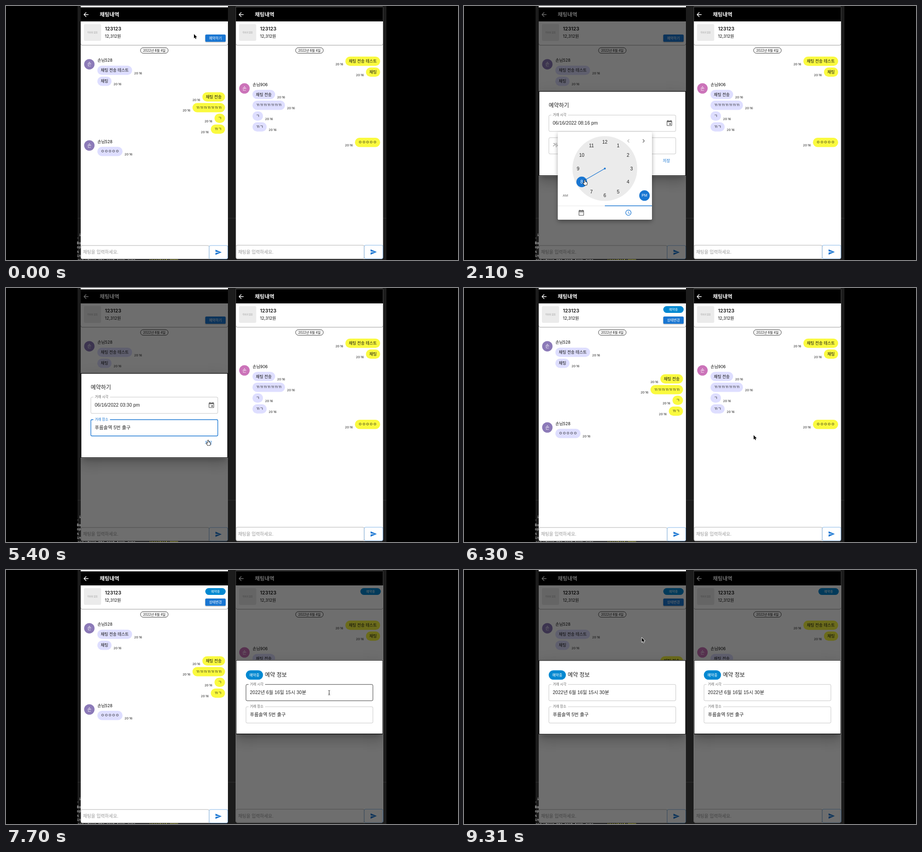
Write an HTML page with a canvas that moves like this. It is 998x561 px and loops after 9420 ms.

```html
<!DOCTYPE html>
<html lang="ko">
<head>
<meta charset="utf-8">
<title>채팅 예약</title>
<style>
html, body { margin: 0; width: 100%; height: 100%; overflow: hidden; background: #000; }
canvas { display: block; width: 998px; height: 561px; }
</style>
</head>
<body>
<canvas id="stage"></canvas>
<script>
const W = 998, H = 561, LOOP = 9420;
const canvas = document.getElementById('stage');
const ctx = canvas.getContext('2d');
const ratio = window.devicePixelRatio || 1;
canvas.width = W * ratio;
canvas.height = H * ratio;

const BLUE = '#1976d2', CHIP = '#0288d1', INK = 'rgba(0,0,0,.87)', GREY = 'rgba(0,0,0,.6)';
const CHAT = 'Inter, "Noto Sans CJK KR", "Noto Sans CJK", sans-serif';
const FORM = '"Liberation Sans", "Noto Sans CJK KR", "Noto Sans CJK", sans-serif';
const MONO = '"DejaVu Sans Mono", monospace';
const PLACE = '푸름솔역 5번 출구';
const SHIFT = 342.5;

const ICON = {
  back: 'M20 11H7.83l5.59-5.59L12 4l-8 8 8 8 1.41-1.41L7.83 13H20v-2z',
  send: 'M2.01 21 23 12 2.01 3 2 10l15 2-15 2z',
  date: 'M17 12h-5v5h5v-5zM16 1v2H8V1H6v2H5c-1.11 0-1.99.9-1.99 2L3 19c0 1.1.89 2 2 2h14c1.1 0 2-.9 2-2V5c0-1.1-.9-2-2-2h-1V1h-2zm3 18H5V8h14v11z',
  range: 'M9 11H7v2h2v-2zm4 0h-2v2h2v-2zm4 0h-2v2h2v-2zm2-7h-1V2h-2v2H8V2H6v2H5c-1.11 0-1.99.9-1.99 2L3 20c0 1.1.89 2 2 2h14c1.1 0 2-.9 2-2V6c0-1.1-.9-2-2-2zm0 16H5V9h14v11z',
  time: 'M12 2a10 10 0 1 0 0 20 10 10 0 0 0 0-20zm0 18a8 8 0 1 1 0-16 8 8 0 0 1 0 16zM12.5 7H11v6l5.25 3.15.75-1.23-4.5-2.67z',
  prev: 'M15.41 16.59 10.83 12l4.58-4.59L14 6l-6 6 6 6z',
  next: 'M8.59 16.59 13.17 12 8.59 7.41 10 6l6 6-6 6z',
  down: 'M7 10l5 5 5-5z'
};
for (const name in ICON) ICON[name] = new Path2D(ICON[name]);

const ramp = (t, a, b) => Math.min(1, Math.max(0, (t - a) / (b - a)));
const ease = p => p * p * (3 - 2 * p);

function text(str, x, y, size, o = {}) {
  ctx.font = `${o.weight || 400} ${size}px ${o.font || CHAT}`;
  ctx.letterSpacing = (o.space || 0) + 'px';
  ctx.textAlign = o.align || 'left';
  ctx.fillStyle = o.color || '#111';
  ctx.fillText(str, x, y + size * .36);
}

function box(x, y, w, h, r, fill, stroke, line = 1) {
  ctx.beginPath();
  ctx.roundRect(x, y, w, h, r);
  if (fill) { ctx.fillStyle = fill; ctx.fill(); }
  if (stroke) { ctx.strokeStyle = stroke; ctx.lineWidth = line; ctx.stroke(); }
}

function disc(x, y, r, fill) {
  ctx.beginPath();
  ctx.arc(x, y, r, 0, Math.PI * 2);
  ctx.fillStyle = fill;
  ctx.fill();
}

function icon(name, x, y, color, scale = .65) {
  ctx.save();
  ctx.translate(x - 12 * scale, y - 12 * scale);
  ctx.scale(scale, scale);
  ctx.fillStyle = color;
  ctx.fill(ICON[name], 'evenodd');
  ctx.restore();
}

function shadowed(blur, dy, alpha, draw) {
  ctx.save();
  ctx.shadowColor = `rgba(0,0,0,${alpha})`;
  ctx.shadowBlur = blur * ratio;
  ctx.shadowOffsetY = dy * ratio;
  draw();
  ctx.restore();
}

function pill(label, x, y, w, h, size) {
  box(x, y, w, h, h / 2, CHIP);
  text(label, x + w / 2, y + h / 2, size, { weight: 500, color: '#fff', align: 'center' });
}

function button(label) {
  shadowed(2.5, 1, .35, () => box(440, 63, 45, 16, 2.6, BLUE));
  text(label, 462.5, 71, 7.6, { weight: 500, color: '#fff', align: 'center' });
}

// Positions below are those of the left phone; the right one is the same, shifted.
function bubble(str, y, mine) {
  ctx.font = `400 8.8px ${CHAT}`;
  ctx.letterSpacing = '0px';
  const w = ctx.measureText(str).width + 15.2;
  const x = mine ? 483.6 - w : 201.7;
  box(x, y - 10.2, w, 20.4, 10.2, mine ? '#fafa3f' : '#dedeff');
  text(str, x + 7.6, y, 8.8);
  text('20:16', mine ? x - 4.5 : x + w + 4.5, y + 6.5, 6.8, { align: mine ? 'right' : 'left', color: '#222' });
}

function sender(name, y, color) {
  disc(184, y, 11.5, color);
  text(name[0], 184, y, 10, { color: '#fff', align: 'center' });
  text(name, 202, y - 8.7, 9);
}

function leftChat() {
  sender('손님528', 128.7, '#8c7ab8');
  bubble('채팅 전송 테스트', 142, false);
  bubble('채팅', 166.2, false);
  bubble('채팅 전송', 200.7, true);
  bubble('ㄲㄲㄲㄲㄲㄲㄲ', 224.5, true);
  bubble('ㄱ', 248, true);
  bubble('ㄲㄱ', 272, true);
  sender('손님528', 308, '#8c7ab8');
  bubble('ㅇㅇㅇㅇㅇ', 321.3, false);
}

function rightChat() {
  bubble('채팅 전송 테스트', 122, true);
  bubble('채팅', 146, true);
  sender('손님906', 182, '#cb73b9');
  bubble('채팅 전송', 195.4, false);
  bubble('ㄲㄲㄲㄲㄲㄲㄲ', 219.3, false);
  bubble('ㄱ', 243, false);
  bubble('ㄲㄱ', 267, false);
  bubble('ㅇㅇㅇㅇㅇ', 301.2, true);
}

function card() {
  ctx.save();
  ctx.beginPath();
  ctx.rect(165, 83, 325, 6);
  ctx.clip();
  box(165.3, 40, 324.4, 46.6, 3, null, '#8f8f8f', .9);
  ctx.restore();
  box(172, 40, 38, 37, 3, '#ebebeb');
  text('이미지 없음', 191, 58.7, 4.6, { color: '#999', align: 'center' });
  text('123123', 218.4, 50.2, 10.6, { weight: 600, space: .1 });
  text('12,312원', 218.3, 66.2, 9.3);
}

function page(chat, dy) {
  box(165, 3, 325, 556, [0, 0, 4, 4], '#fff');
  ctx.fillStyle = '#000';
  ctx.fillRect(165, 3, 325, 31);
  icon('back', 176.7, 19, '#fff', .68);
  text('채팅내역', 207, 19, 11.7, { weight: 700, color: '#fff' });
  card();

  box(297, 92, 61, 12.3, 6, '#fff', '#222', .9);
  text('2022년 6월 4일', 327.5, 98.2, 7.05, { align: 'center' });
  chat();

  box(165.5, 529 + dy, 283, 29.6, 3, '#fff', '#a8a8a8', .9);
  text('채팅을 입력하세요.', 170, 543.7 + dy, 9.85, { color: '#999' });
  box(448.5, 529 + dy, 41.2, 29.8, 3, '#fff', 'rgba(25,118,210,.6)', .9);
  icon('send', 469, 544 + dy, BLUE);
}

function field(y, label, value, state) {
  const color = { hover: INK, focus: BLUE }[state] || 'rgba(0,0,0,.25)';
  const floating = value || state === 'focus';
  box(187.4, y, 280.2, 36, 2.6, '#fff', color, state === 'focus' ? 1.4 : .9);
  if (floating) {
    ctx.fillStyle = '#fff';
    ctx.fillRect(193, y - 1.5, 36.5, 3);
    text(label, 196, y - .7, 7.6, { font: FORM, color: state === 'focus' ? BLUE : GREY });
  } else {
    text(label, 196, y + 16.3, 10, { font: FORM, color: GREY });
  }
  if (value) text(value, 196, y + 17.6, 10.4, { font: FORM, color: INK, space: .07 });
}

function dialog(alpha, y, h, body) {
  if (alpha <= 0) return;
  ctx.save();
  ctx.beginPath();
  ctx.rect(165, 3, 325, 556);
  ctx.clip();
  ctx.globalAlpha = alpha;
  ctx.fillStyle = 'rgba(0,0,0,.57)';
  ctx.fillRect(165, 3, 325, 556);
  const paper = inset => box(165 + inset, y + inset, 325 - 2 * inset, h - 2 * inset, 0, '#fff');
  shadowed(30, 6, .12, () => paper(0));
  shadowed(25, 15, .14, () => paper(0));
  shadowed(10, 7, .2, () => paper(4.5));
  paper(0);
  box(165.65, y + .65, 323.7, h - 1.3, 0, null, '#000', 1.3);
  body();
  ctx.restore();
}

function stamp(t) {
  const day = t < 1600 ? '04' : '16';
  const time = t < 2400 ? '08:16' : t < 2700 ? '03:16' : '03:30';
  return `06/${day}/2022 ${time} pm`;
}

function bookingForm(t, hover) {
  text('예약하기', 187, 219.3, 12.2, { weight: 500, font: FORM, color: INK });
  field(241, '거래 시각', stamp(t), hover(241) ? 'hover' : '');
  icon('date', 453.5, 259, 'rgba(0,0,0,.6)');
  const count = Math.round(ramp(t, 4050, 4900) * PLACE.length);
  const focus = t >= 4000 && t < 5500;
  field(290.8, '거래 장소', PLACE.slice(0, count), focus ? 'focus' : hover(290.8) ? 'hover' : '');
  text('저장', 447, 341.5, 8.7, { weight: 500, color: BLUE, align: 'center' });
}

function bookingInfo(hover) {
  pill('예약중', 187, 221.4, 38, 20.8, 8);
  text('예약 정보', 229, 231.4, 12.3, { weight: 500, font: FORM, color: INK });
  field(252.8, '거래 시각', '2022년 6월 16일 15시 30분', hover(252.8) ? 'hover' : '');
  field(302, '거래 장소', PLACE, hover(302) ? 'hover' : '');
}

function tabs(y, clock) {
  ctx.fillStyle = 'rgba(0,0,0,.12)';
  ctx.fillRect(207, y, 208, .8);
  ctx.fillStyle = BLUE;
  ctx.fillRect(clock ? 311 : 207, y - .4, 104, 1.5);
  icon('range', 259, y + 15.5, clock ? GREY : BLUE);
  icon('time', 363, y + 15.5, clock ? BLUE : GREY);
}

function calendar(t) {
  shadowed(10, 4, .35, () => box(207, 278, 208, 248, 2.6, '#fff'));
  text('June 2022', 222, 298, 10.4, { font: FORM, weight: 500, color: INK });
  icon('down', 283, 298, GREY);
  icon('prev', 363, 298, GREY);
  icon('next', 396.5, 298, GREY);
  const o = { font: FORM, align: 'center', color: GREY };
  [...'SMTWTFS'].forEach((d, i) => text(d, 233 + 26 * i, 326, 7.8, o));
  const chosen = t < 1600 ? 4 : 16;
  for (let d = 1; d <= 30; d++) {
    const cell = d + 2, x = 233 + 26 * (cell % 7), y = 352 + 26 * Math.floor(cell / 7);
    if (d === chosen) disc(x, y, 11.7, BLUE);
    else if (d === 4) box(x - 11.7, y - 11.7, 23.4, 23.4, 11.7, null, GREY, .7);
    text(d, x, y, 7.8, { ...o, color: d === chosen ? '#fff' : INK });
  }
  tabs(495, false);
}

function clock(t) {
  const minutes = t >= 2500;
  const value = minutes ? (t < 2700 ? 16 / 5 : 6) : (t < 2400 ? 8 : 3);
  const spot = n => {
    const a = n * Math.PI / 6;
    return [311 + 59 * Math.sin(a), 359 - 59 * Math.cos(a)];
  };
  shadowed(10, 4, .35, () => box(207, 278, 208, 194, 2.6, '#fff'));
  disc(311, 359, 71.5, '#ebebeb');
  const [hx, hy] = spot(value);
  ctx.beginPath();
  ctx.moveTo(311, 359);
  ctx.lineTo(hx, hy);
  ctx.strokeStyle = BLUE;
  ctx.lineWidth = 1.3;
  ctx.stroke();
  disc(311, 359, 2, BLUE);
  disc(hx, hy, 11.8, BLUE);
  for (let n = 1; n <= 12; n++) {
    const label = minutes ? String(n * 5 % 60).padStart(2, '0') : n;
    text(label, ...spot(n), 10.4, { font: FORM, align: 'center', color: n === value ? '#fff' : INK });
  }
  icon('prev', 363, 298, 'rgba(0,0,0,.3)');
  icon('next', 396.5, 298, GREY);
  disc(398.5, 418.7, 11.6, BLUE);
  text('AM', 224, 418.3, 8, { font: FORM, align: 'center', color: GREY });
  text('PM', 398.5, 418.3, 8.2, { font: FORM, align: 'center', color: '#fff' });
  tabs(441, true);
}

function picker(t) {
  const alpha = ramp(t, 1100, 1300) * (1 - ramp(t, 3250, 3450));
  if (alpha <= 0) return;
  ctx.save();
  ctx.globalAlpha = alpha;
  t < 1700 ? calendar(t) : clock(t);
  ctx.restore();
}

// time, x, y, pointer shape
const PATH = [
  [0, 415, 62, 'arrow'], [300, 460, 69, 'hand'], [500, 460, 69, 'arrow'],
  [800, 313, 259, 'beam'], [900, 313, 259, 'beam'], [1100, 453, 259, 'hand'],
  [1300, 453, 259, 'arrow'], [1600, 337, 404, 'hand'], [1700, 337, 404, 'arrow'],
  [2000, 398, 417, 'hand'], [2100, 267.5, 390, 'hand'], [2200, 267.5, 390, 'hand'],
  [2400, 370, 361, 'hand'], [2500, 370, 361, 'hand'], [2700, 311, 420, 'hand'],
  [3000, 311, 420, 'arrow'], [3300, 373.5, 467, 'arrow'], [3800, 373.5, 467, 'arrow'],
  [4000, 290, 308, 'beam'], [4100, 290, 308, 'none'], [5000, 290, 308, 'arrow'],
  [5400, 447, 342, 'hand'], [6000, 447, 342, 'arrow'], [6300, 639.5, 325, 'arrow'],
  [6900, 805, 48, 'hand'], [7100, 805, 48, 'arrow'], [7500, 713.5, 271, 'beam'],
  [7900, 713.5, 271, 'arrow'], [8700, 462, 47, 'hand'], [9000, 462, 47, 'arrow'],
  [9310, 392.5, 149.5, 'arrow']
];

function pointerAt(t) {
  let i = PATH.length - 1;
  while (PATH[i][0] > t) i--;
  const a = PATH[i], b = PATH[i + 1] || a;
  const p = b === a ? 0 : ease(ramp(t, a[0], b[0]));
  return { x: a[1] + (b[1] - a[1]) * p, y: a[2] + (b[2] - a[2]) * p, shape: a[3] };
}

const POINTER = {
  arrow: new Path2D('M0 0V9.6L2.2 7.6 3.7 11 5.2 10.3 3.8 7H6.8Z'),
  hand: new Path2D('M-1.6-5.2Q-.5-6.3.2-5V-1.6Q1-2.2 1.6-1.2 2.4-1.7 2.9-.7 4.2-.9 4.2.5V2.4L3.2 5.4H-1.6L-4.3 1.5Q-4.4.1-3.1.6L-1.7 1.8Z')
};

function drawPointer({ x, y, shape }) {
  if (shape === 'none') return;
  ctx.save();
  ctx.translate(x, y);
  ctx.lineJoin = 'round';
  if (shape === 'beam') {
    ctx.beginPath();
    for (const s of [-1, 1]) {
      ctx.moveTo(-2, 5 * s);
      ctx.quadraticCurveTo(0, 5 * s, 0, 3.8 * s);
      ctx.quadraticCurveTo(0, 5 * s, 2, 5 * s);
    }
    ctx.moveTo(0, -4);
    ctx.lineTo(0, 4);
    ctx.moveTo(-1, 1.6);
    ctx.lineTo(1, 1.6);
    ctx.strokeStyle = '#222';
    ctx.lineWidth = .9;
    ctx.stroke();
  } else {
    const isArrow = shape === 'arrow';
    ctx.strokeStyle = isArrow ? '#fff' : '#000';
    ctx.lineWidth = 1.7;
    ctx.stroke(POINTER[shape]);
    ctx.fillStyle = isArrow ? '#000' : '#fff';
    ctx.fill(POINTER[shape]);
  }
  ctx.restore();
}

function desktop() {
  ctx.fillStyle = '#000';
  ctx.fillRect(0, 0, W, H);
  ctx.fillStyle = '#1c1c1c';
  ctx.fillRect(158, 0, 682, H);
  ctx.fillStyle = '#343434';
  ctx.fillRect(158, 468.3, 682, .9);
  ctx.fillRect(507, 0, 325, 3);
  ctx.fillStyle = '#fff';
  ctx.fillRect(165, 0, 325, 3);
  ctx.save();
  ctx.beginPath();
  ctx.rect(157, 495, 683, H - 495);
  ctx.clip();
  const o = { font: MONO, color: '#ddd' };
  [' i', "'", 'Bo', 'op', 's', 'in'].forEach((s, i) => text(s, 156.5, 505 + 9.2 * i, 7.6, o));
  text('ess while the next task runs', 158, 561.5, 7.6, o);
  text('localhost:8080', 316, 561.5, 7.6, { font: MONO, color: '#d8d83c' });
  ctx.restore();
}

function render(t) {
  const pointer = pointerAt(t);
  const hoverOn = shift => y => pointer.shape === 'beam' &&
    pointer.x - shift > 187 && pointer.x - shift < 468 && pointer.y > y && pointer.y < y + 36;
  ctx.setTransform(ratio, 0, 0, ratio, 0, 0);
  desktop();

  page(leftChat, 0);
  if (t < 6000) {
    button('예약하기');
  } else {
    pill('예약중', 440, 40, 45, 15, 7);
    button('상태변경');
  }
  dialog(ramp(t, 350, 600) * (1 - ramp(t, 6050, 6250)), 188, 187.3, () => bookingForm(t, hoverOn(0)));
  picker(t);
  dialog(ramp(t, 8850, 9100), 199.2, 164.2, () => bookingInfo(hoverOn(0)));

  ctx.save();
  ctx.translate(SHIFT, 0);
  page(rightChat, -.7);
  if (t >= 6600) pill('예약중', 440, 40, 45, 15, 7);
  dialog(ramp(t, 7000, 7250), 198.7, 164.2, () => bookingInfo(hoverOn(SHIFT)));
  ctx.restore();

  drawPointer(pointer);
}

const start = performance.now();
function tick() {
  const t = (performance.now() - start) % LOOP;
  render(t >= 9300 ? 9310 : Math.floor(t / 100) * 100);
  requestAnimationFrame(tick);
}
tick();
</script>
</body>
</html>
```
